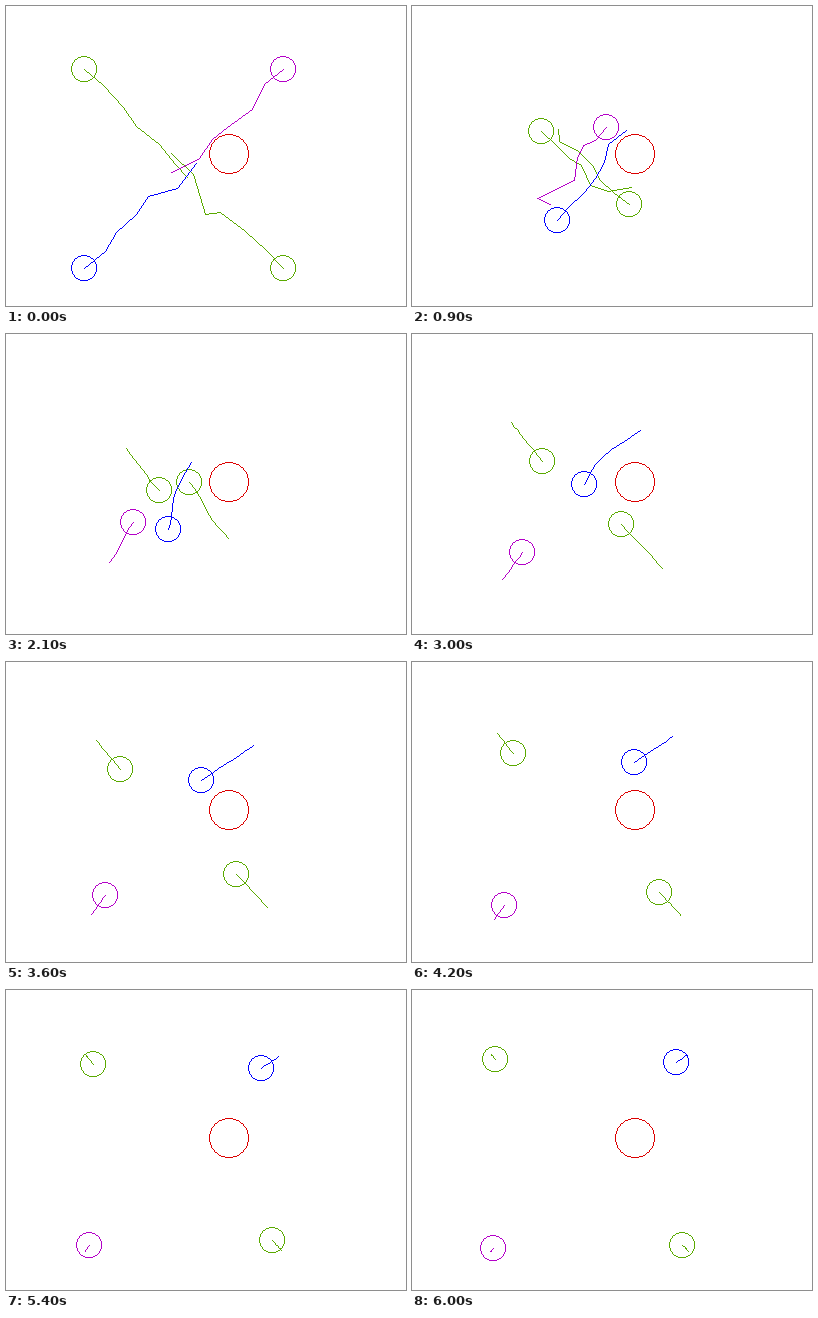
These frames come from a looping animation (400x300 px, 6300 ms). A matplotlib script:

```python
import numpy as np
import matplotlib.pyplot as plt
from matplotlib.animation import FuncAnimation

W, H, DPI = 400, 300, 100
FRAMES, STEP = 21, 300
LEFT, TOP, RIGHT, BOTTOM = 78, 63, 277, 262
GREEN, MAGENTA, BLUE, RED = (90, 170, 0), (180, 0, 200), (0, 0, 255), (220, 0, 0)

KEYS = np.array([0, .9, 2.1, 3, 3.6])  # seconds at the waypoints
FREE = 1.2                             # plans are noisy before this time


class Canvas:
    """Plain one-pixel strokes without antialiasing."""

    def __init__(self):
        self.pixels = np.full((H, W, 3), 255, np.uint8)

    def dots(self, x, y, color):
        self.pixels[np.floor(y).astype(int), np.floor(x).astype(int)] = color

    def polyline(self, points, color):
        points = np.rint(points)
        for a, b in zip(points, points[1:]):
            n = int(abs(b - a).max()) + 1
            x, y = np.linspace(a, b, n).T
            self.dots(x + .5, y + .5, color)

    def circle(self, center, r, color):
        cx, cy = np.rint(center)
        half = np.ceil(r / np.sqrt(2))
        u = np.arange(-half + .5, half)
        v = np.sqrt(r * r - u * u)
        for s in (-1, 1):
            self.dots(cx + u, cy + s * v, color)
            self.dots(cx + s * v, cy + u, color)


class Agent:
    """A disc that swaps corners, dodging the others, then eases home."""

    def __init__(self, seed, color, start, via, pace=1):
        self.seed, self.color, self.pace = seed, color, pace
        self.goal = np.array([LEFT + RIGHT, TOP + BOTTOM]) - start
        self.path = np.array([start, *via], float)
        self.slope = np.gradient(self.path, KEYS, axis=0)
        self.slope[-1] = .7 * pace * (self.goal - self.path[-1])

    def at(self, t):
        if t >= KEYS[-1]:
            s = t - KEYS[-1]
            left = np.exp(-self.pace * (.7 * s + .05 * s * s))
            return self.goal + left * (self.path[-1] - self.goal)
        i = np.searchsorted(KEYS, t, "right") - 1
        h = KEYS[i + 1] - KEYS[i]
        u = (t - KEYS[i]) / h
        p, m = self.path, self.slope * h
        return ((1 + 2 * u) * (1 - u) ** 2 * p[i] + u * (1 - u) ** 2 * m[i]
                + u * u * (3 - 2 * u) * p[i + 1] + u * u * (u - 1) * m[i + 1])

    def plan(self, t):
        """A jittered straight guess at first, later the path just ahead."""
        if t < FREE - .01:
            rng = np.random.default_rng([self.seed, round(t * 10)])
            k = np.arange(7)[:, None]
            pos = self.at(t)
            return pos + .55 * (self.goal - pos) * k / 6 + 1.4 * k * rng.normal(size=(7, 2))
        horizon = 1.2 + .018 * t * t
        return np.array([self.at(t + s) for s in np.linspace(0, horizon, 9)])

    def draw(self, canvas, t):
        canvas.polyline(self.plan(t), self.color)
        canvas.circle(self.at(t), 12.5, self.color)


agents = [
    Agent(1, GREEN, (LEFT, TOP), [(129, 125), (183, 148), (209, 190), (230, 212)]),
    Agent(2, MAGENTA, (RIGHT, TOP), [(194, 121), (127, 188), (110, 218), (99, 233)]),
    Agent(3, GREEN, (RIGHT, BOTTOM), [(217, 198), (153, 156), (130, 127), (114, 107)]),
    Agent(4, BLUE, (LEFT, BOTTOM), [(145, 214), (162, 195), (172, 150), (195, 118)],
          pace=.92),
]


def render(i):
    canvas = Canvas()
    canvas.circle((223, 148), 19.5, RED)
    for agent in agents:
        agent.draw(canvas, i * STEP / 1000)
    return canvas.pixels


fig = plt.figure(figsize=(W / DPI, H / DPI), dpi=DPI, facecolor="white")
ax = fig.add_axes([0, 0, 1, 1])
ax.axis("off")
image = ax.imshow(render(0), extent=(0, W, H, 0), interpolation="nearest",
                  aspect="auto")


def update(i):
    image.set_data(render(i))
    return [image]


anim = FuncAnimation(fig, update, frames=FRAMES, interval=STEP, repeat=True,
                     repeat_delay=0)
plt.show()
```
